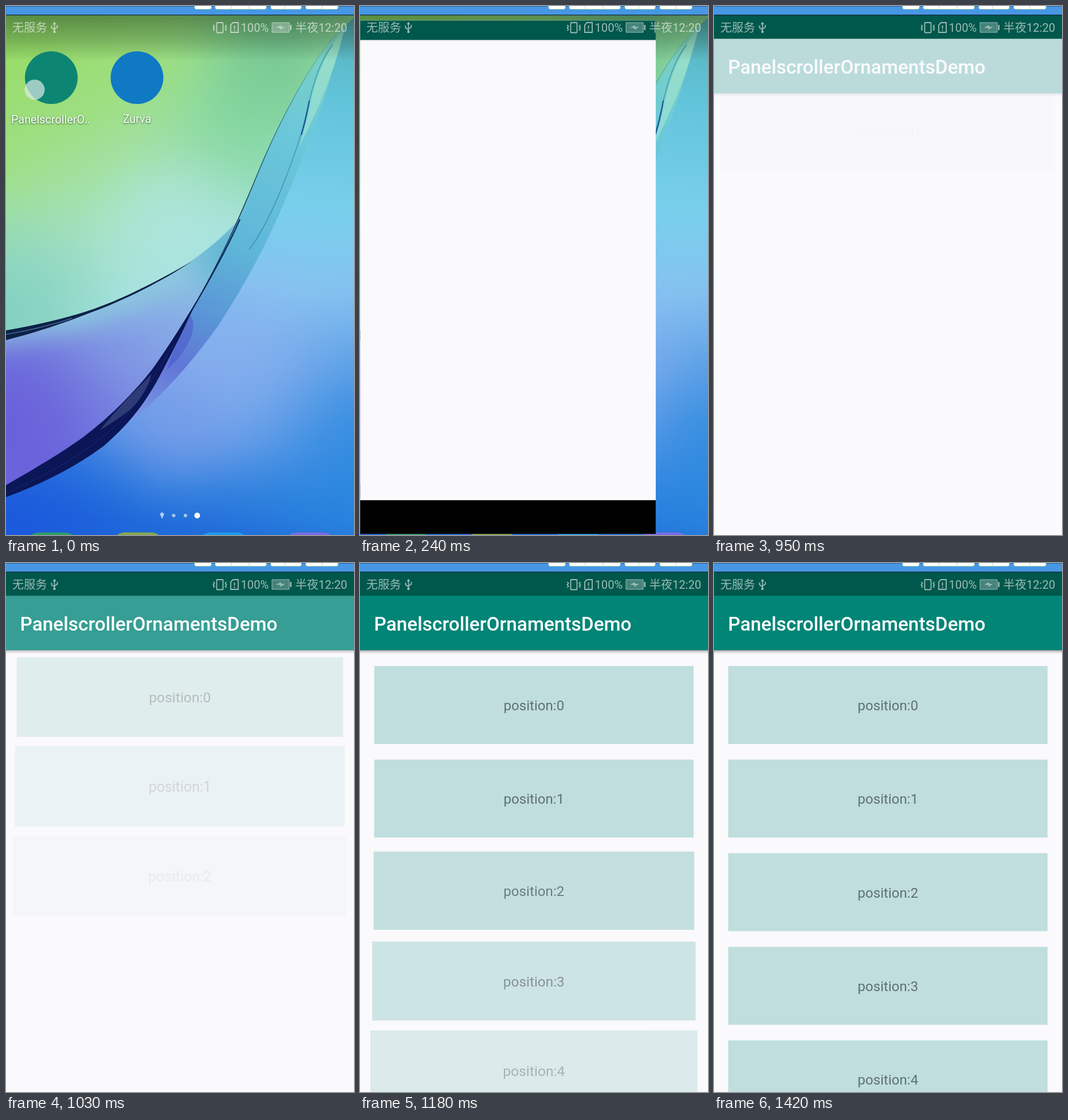
An HTML page for the animation above (2420 ms loop, 607 by 923 pixels).

```html
<!DOCTYPE html>
<html lang="en">
<head>
<meta charset="utf-8">
<title>App launch</title>
<style>
html, body { margin: 0; width: 100%; height: 100%; overflow: hidden; background: #faf9fc; }
svg { display: block; width: 100%; height: 100%; }
text { font-family: Roboto, "Noto Sans CJK SC", "Noto Sans CJK", sans-serif; }
.label { font-size: 19.8px; fill: #fff; text-shadow: 0 1px 3px rgba(0, 40, 30, .7); }
.item text { font-size: 24.1px; fill: #607072; text-anchor: middle; }
</style>
</head>
<body>
<svg viewBox="0 0 607 923" preserveAspectRatio="none">
  <defs id="defs">
    <linearGradient id="sky" gradientUnits="userSpaceOnUse" x1="500" y1="20" x2="400" y2="923">
      <stop offset="0" stop-color="#57b3ba"/>
      <stop offset=".15" stop-color="#62c4da"/>
      <stop offset=".36" stop-color="#78cfec"/>
      <stop offset=".52" stop-color="#86c2f0"/>
      <stop offset=".67" stop-color="#7eaeec"/>
      <stop offset=".82" stop-color="#5a96e6"/>
      <stop offset=".92" stop-color="#3280de"/>
      <stop offset="1" stop-color="#206cda"/>
    </linearGradient>
    <linearGradient id="leaf" gradientUnits="userSpaceOnUse" x1="60" y1="50" x2="290" y2="470">
      <stop offset="0" stop-color="#98dc68"/>
      <stop offset=".35" stop-color="#9edf84"/>
      <stop offset=".7" stop-color="#a6e2be"/>
      <stop offset="1" stop-color="#a6e2e0"/>
    </linearGradient>
    <linearGradient id="lens" gradientUnits="userSpaceOnUse" x1="340" y1="420" x2="60" y2="800">
      <stop offset="0" stop-color="#8cc8e2"/>
      <stop offset=".35" stop-color="#86a6e6"/>
      <stop offset=".65" stop-color="#7886e0"/>
      <stop offset="1" stop-color="#6a68dc"/>
    </linearGradient>
    <linearGradient id="glass" gradientUnits="userSpaceOnUse" x1="580" y1="40" x2="230" y2="720">
      <stop offset="0" stop-color="#86d8b8"/>
      <stop offset=".25" stop-color="#6cc8d8"/>
      <stop offset=".55" stop-color="#58b2d4"/>
      <stop offset=".72" stop-color="#5290d2"/>
      <stop offset=".85" stop-color="#5c6cd2"/>
      <stop offset="1" stop-color="#7c96e4"/>
    </linearGradient>
    <linearGradient id="ridge" gradientUnits="userSpaceOnUse" x1="560" y1="60" x2="420" y2="340">
      <stop offset="0" stop-color="#2f8f96" stop-opacity=".2"/>
      <stop offset="1" stop-color="#123c5c"/>
    </linearGradient>
    <linearGradient id="shade" x2="0" y2="1">
      <stop offset="0" stop-color="#0c2a18" stop-opacity=".45"/>
      <stop offset=".5" stop-color="#0c2a18" stop-opacity=".26"/>
      <stop offset="1" stop-color="#0c2a18" stop-opacity="0"/>
    </linearGradient>
    <linearGradient id="drop" x2="0" y2="1">
      <stop offset="0" stop-color="#000" stop-opacity=".4"/>
      <stop offset=".4" stop-color="#000" stop-opacity=".14"/>
      <stop offset="1" stop-color="#000" stop-opacity="0"/>
    </linearGradient>
    <filter id="soft" x="-20%" y="-50%" width="140%" height="200%"><feGaussianBlur stdDeviation="22"/></filter>
    <path id="leafShape" d="M0 0H607V20L575 50C530 100 475 205 440 290Q430 330 415 362C375 412 310 458 250 490Q140 542 0 572Z"/>
    <path id="lensShape" d="M0 572Q140 542 250 490C310 458 375 412 415 362C395 410 365 465 330 520C300 570 275 625 230 680C180 735 90 800 0 848Z"/>
    <clipPath id="leafClip"><use href="#leafShape"/></clipPath>
    <clipPath id="lensClip"><use href="#lensShape"/></clipPath>
  </defs>

  <g id="home">
    <rect width="607" height="923" fill="url(#sky)"/>
    <g id="skyGlow"></g>
    <use href="#leafShape" fill="url(#leaf)"/>
    <g id="leafGlow" clip-path="url(#leafClip)"></g>
    <use href="#lensShape" fill="url(#lens)"/>
    <g id="lensGlow" clip-path="url(#lensClip)">
      <path d="M-60 584Q140 542 250 490T430 350" fill="none" stroke="#8ccade" stroke-width="46" filter="url(#soft)"/>
    </g>
    <path fill="url(#glass)" opacity=".85" d="M592 34L575 50C530 100 475 205 440 290S372 448 330 520C300 570 275 625 220 722C270 684 330 615 372 555C414 490 450 425 482 350C515 275 548 190 566 125Q580 75 592 34Z"/>
    <path fill="#b0ecd2" opacity=".5" d="M592 34C565 70 545 110 532 165C525 200 520 215 512 245C545 180 575 110 592 34Z"/>
    <g fill="none">
      <path stroke="#2c7ca0" stroke-width="1.300" opacity=".7" d="M570 68C535 110 528 180 515 222C498 278 462 376 424 425"/>
      <path stroke="#1c4f8c" stroke-width="2" d="M529 165Q524 195 515 225"/>
      <path stroke="url(#ridge)" stroke-width="1.600" d="M575 50C530 100 475 205 440 290S372 448 330 520"/>
      <path stroke="#0c2450" stroke-width="2" d="M408 372C385 425 355 478 320 538"/>
    </g>
    <path fill="#4a54cc" opacity=".5" d="M322 540C335 560 320 600 280 635Q300 580 322 540Z"/>
    <path fill="#0b1657" d="M0 836C45 810 90 784 135 752C185 714 225 672 255 634Q290 585 332 515C315 555 295 595 270 642C245 690 215 730 170 768Q100 820 0 857Z"/>
    <path fill="#39457f" opacity=".8" d="M164 740C192 704 225 672 254 642C247 668 232 692 212 708Q188 726 164 740Z"/>
    <path fill="none" stroke="#27389a" opacity=".5" d="M0 850C80 815 165 765 215 708Q255 655 292 590"/>
    <path fill="#0d2148" d="M0 566Q80 552 140 533C190 517 255 486 325 445C275 479 205 514 150 534Q75 564 0 583Z"/>
    <path fill="none" stroke="#5a86ae" stroke-width="1.200" d="M0 573Q60 563 115 545"/>
    <rect y="16" width="607" height="80" fill="url(#shade)"/>

    <circle cx="79" cy="125" r="46" fill="#0d8573"/>
    <circle cx="228.500" cy="125" r="46" fill="#1079c4"/>
    <circle cx="50" cy="146" r="17.500" fill="#e2ecea" opacity=".68"/>
    <text class="label" x="9" y="205">PanelscrollerO..</text>
    <text class="label" x="228.500" y="204" text-anchor="middle">Zurva</text>

    <g fill="#fff">
      <path opacity=".65" d="M269 887a3.200 3.200 0 0 1 6.400 0q0 3-2 4v3h-2.400v-3q-2-1-2-4Z"/>
      <circle cx="292.500" cy="889" r="3" opacity=".6"/>
      <circle cx="313" cy="889" r="3" opacity=".6"/>
      <circle cx="333.500" cy="889" r="5"/>
    </g>
    <g id="dock"></g>
  </g>

  <g id="win">
    <rect width="607" height="1079" fill="#faf9fc"/>
    <rect width="607" height="41" fill="#00574b"/>
    <rect y="41" width="607" height="1.200" fill="#cbd8d6"/>
    <rect y="1008" width="607" height="71" fill="#000"/>
  </g>

  <g id="app">
    <g id="list"></g>
    <rect y="152" width="607" height="7" fill="url(#drop)"/>
    <rect y="57" width="607" height="95" fill="#008577"/>
    <text x="24.500" y="118" font-size="33.400" font-weight="500" fill="#fff">PanelscrollerOrnamentsDemo</text>
  </g>

  <g fill="#fff" stroke="#fff" opacity=".6" font-size="20.200">
    <g stroke="none">
      <text x="11" y="45">无服务</text>
      <text x="409.500" y="45">100%</text>
      <text x="504.500" y="45">半夜12:20</text>
      <path d="M81.500 32L84.500 27.500L87.500 32Z"/>
      <circle cx="84.500" cy="45" r="2.200"/>
      <path d="M464 29h30v17h-30Z" opacity=".45"/>
      <rect x="495.500" y="33" width="2.500" height="9"/>
      <path d="M471 37.500L480 33.500V36.500H487L478.500 41.500V38.500Z"/>
    </g>
    <g fill="none" stroke-width="1.800">
      <path d="M84.500 30V44M79.500 34V38L84.500 41.500M89.500 33V37L84.500 40"/>
      <rect x="367.500" y="29" width="11" height="17.500" rx="1"/>
      <path d="M361.500 33l2 2.500-2 2.500 2 2.500-2 2.500M384.500 33l-2 2.500 2 2.500-2 2.500 2 2.500"/>
      <path d="M396 29h9v17h-13v-13Z"/>
      <path d="M398.500 34v5.500M398.500 41.500v2"/>
      <path d="M464 29h30v17h-30Z" stroke-width="1"/>
    </g>
  </g>

  <rect width="607" height="16" fill="#4797e5"/>
  <rect width="607" height="1" fill="#2b5f98"/>
  <rect y="15" width="607" height="1.300" fill="#15304a"/>
  <g id="tabs" fill="#fff" stroke="#b4dcae"></g>
</svg>

<script>
const NS = "http://www.w3.org/2000/svg";
const $ = id => document.getElementById(id);

function add(parent, tag, attrs, text) {
  const el = document.createElementNS(NS, tag);
  for (const k in attrs) el.setAttribute(k, attrs[k]);
  if (text) el.textContent = text;
  parent.appendChild(el);
  return el;
}

// Soft round spots of colour for the wallpaper
let glowCount = 0;
function glow(parent, x, y, r, color, alpha) {
  const id = "glow" + glowCount++;
  const grad = add($("defs"), "radialGradient", { id });
  for (let d = 0; d <= 1; d += 0.125) {
    const fade = Math.cos(d * Math.PI / 2) ** 2;
    add(grad, "stop", { offset: d, "stop-color": color, "stop-opacity": fade * alpha });
  }
  add($(parent), "circle", { cx: x, cy: y, r, fill: `url(#${id})` });
}

glow("skyGlow", 680, 800, 360, "#2488de", 0.8);
glow("skyGlow", 380, 640, 230, "#88aeee", 0.6);
glow("skyGlow", 280, 730, 170, "#7c9ae8", 0.5);
glow("skyGlow", 0, 940, 330, "#1a58dc", 0.9);
glow("leafGlow", 430, 190, 230, "#7cd49c", 0.75);
glow("leafGlow", 480, 60, 200, "#6cc090", 0.65);
glow("leafGlow", 0, 540, 260, "#82d0c0", 0.9);
glow("leafGlow", 290, 390, 180, "#b0e6e2", 0.6);
glow("lensGlow", 0, 730, 230, "#6a60da", 0.9);
glow("lensGlow", 390, 430, 110, "#5cb2d0", 0.8);

["#2f9c6c", "#86a84c", "#1c9cea", "#7a6ce2"].forEach((fill, i) =>
  add($("dock"), "rect", { x: 35 + i * 150, y: 918.5, width: 90, height: 60, rx: 22, fill }));

[[329, 358], [365, 454, 393, 424], [462, 515, 486], [523, 579, 551]].forEach(([a, b, ...cuts]) => {
  add($("tabs"), "rect", { x: a, y: -6, width: b - a, height: 11.5, rx: 3 });
  cuts.forEach(x => add($("tabs"), "path", { d: `M${x} 0V5` }));
});

const CX = 303.3, ITEM_W = 557, ITEM_H = 136, PITCH = 163.3;
const items = [0, 1, 2, 3, 4].map(i => {
  const g = add($("list"), "g", { class: "item" });
  add(g, "rect", { x: -ITEM_W / 2, y: -ITEM_H / 2, width: ITEM_W, height: ITEM_H, fill: "#bfdedd" });
  add(g, "text", { x: 0, y: 9.2 }, "position:" + i);
  return g;
});

const LOOP = 2420;
const TICKS = [0, 70, 160, 240, 310, 390, 950, 1030, 1100, 1180, 1260, 1340, 1420];
// Window growth and opacity while it opens
const OPENING = [[0, 0], [0.08, 0.25], [0.34, 0.64], [0.8, 1], [0.97, 1]];

const clamp = v => Math.max(0, Math.min(1, v));
const mix = (a, b, p) => a + (b - a) * p;

function draw(time) {
  let n = TICKS.length - 1;
  while (TICKS[n] > time) n--;
  const t = TICKS[n];

  const [p, alpha] = OPENING[n] || [1, 1];
  $("home").style.display = p < 1 ? "" : "none";
  $("win").setAttribute("opacity", alpha);
  $("win").setAttribute("transform",
    `translate(${1.5 * (1 - p)} ${mix(63, 16, p)}) scale(${mix(0.247, 1, p)} ${mix(0.151, 1, p)})`);

  $("app").setAttribute("opacity", t < 950 ? 0 : clamp((t - 912) / 150));
  items.forEach((g, i) => {
    // Staggered fall: ease in and out, fade in, shrink from 105 %
    const u = clamp(0.815 + (t - 1100) / 260 - 0.153 * i);
    const rest = Math.cos(u * Math.PI / 2) ** 2;
    const y = 247.8 + PITCH * i - 32.6 * rest;
    g.setAttribute("opacity", 1 - rest);
    g.setAttribute("transform", `translate(${CX} ${y}) scale(${1 + 0.05 * rest})`);
  });
}

const start = performance.now();
function tick() {
  draw((performance.now() - start) % LOOP);
  requestAnimationFrame(tick);
}
tick();
</script>
</body>
</html>
```
